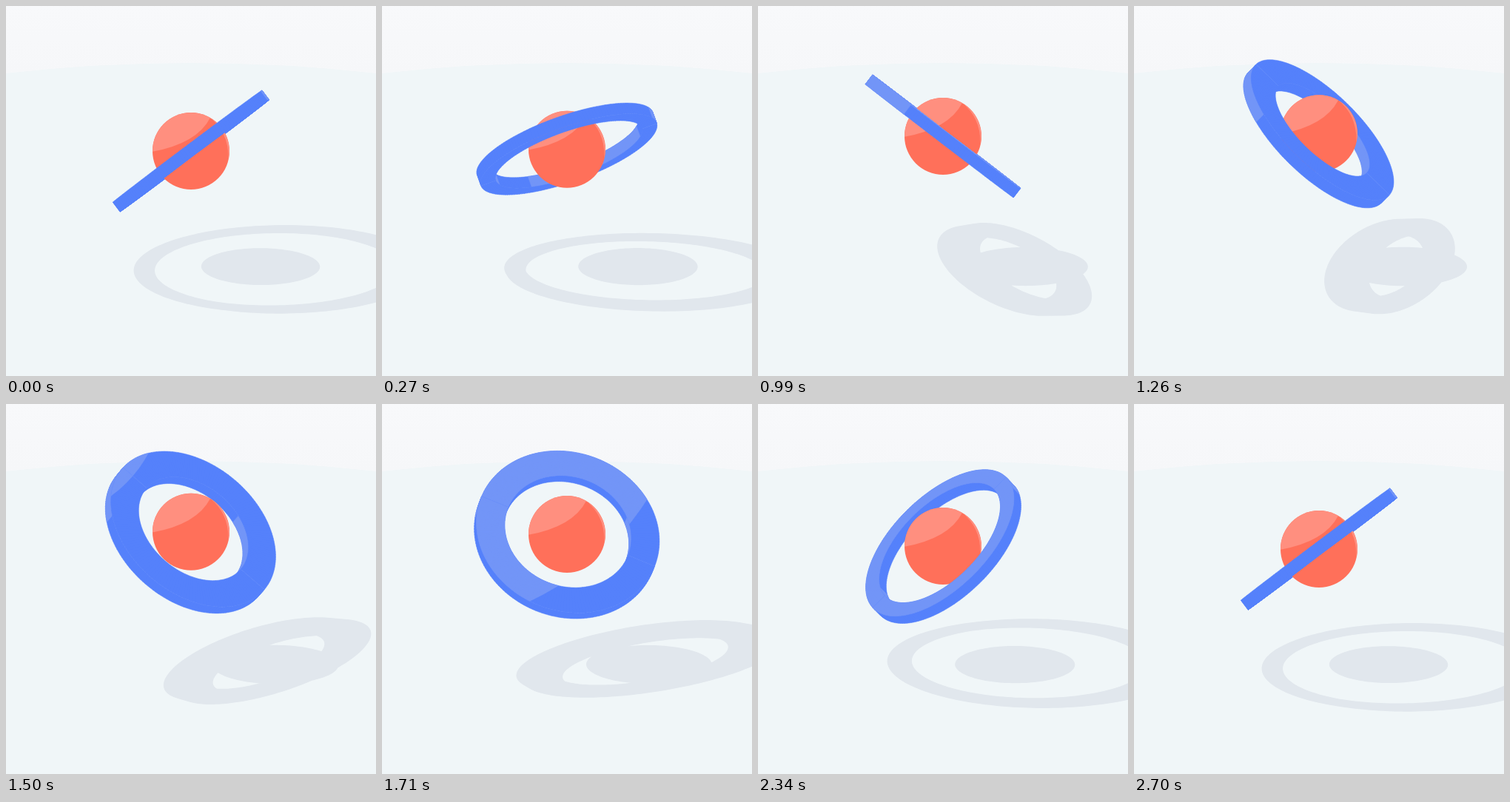
Animation, 500 px wide and 500 px high, one loop 2730 ms. Source, as an HTML page with a canvas:

```html
<!DOCTYPE html>
<html lang="en">
<head>
<meta charset="utf-8">
<title>Ringed planet</title>
<style>
html, body { margin: 0; width: 100%; height: 100%; overflow: hidden; background: #f0f6f8; }
canvas { display: block; width: 500px; height: 500px; }
</style>
</head>
<body>
<canvas id="stage" width="500" height="500"></canvas>
<script>
const ctx = document.getElementById('stage').getContext('2d');
const TURN = 2700, LOOP = 2730;      // one turn, then a short hold
const TAU = Math.PI * 2, RAD = Math.PI / 180;
const SEGS = 180, BALL = 52, OUTER = 126, HALF = 8;
const SIN = Math.sin(20 * RAD), COS = Math.cos(20 * RAD);   // camera pitch
const EYE = 8000;                                           // camera distance
const TILT = 41.4 * RAD, START = 24.7 * RAD;
const RIM = [0.608, 0.04, -0.793];                          // back light direction
const C = {
  ground: '#f0f6f8', shadow: '#e1e7ed',
  blue: '#5581fb', blueLit: '#7295f7',
  red: '#ff705a', redLit: '#ff8f7f'
};

// World axes: x right, y up, z towards the viewer; origin at the ball.
const dot = (a, b) => a[0] * b[0] + a[1] * b[1] + a[2] * b[2];
const mix = (a, s, b, t) => a.map((v, i) => v * s + b[i] * t);
const sub = (a, b) => mix(a, 1, b, -1);
const unit = a => mix(a, 1 / Math.hypot(...a), a, 0);
const cross = (a, b) => [
  a[1] * b[2] - a[2] * b[1], a[2] * b[0] - a[0] * b[2], a[0] * b[1] - a[1] * b[0]
];
const depth = p => p[1] * SIN + p[2] * COS;

function addPoly(path, pts) {
  let area = 0;
  pts.forEach((p, i) => {
    const q = pts[(i + 1) % pts.length];
    area += p[0] * q[1] - q[0] * p[1];
  });
  // one winding for all pieces, so that a joint fill is their union
  if (area < 0) pts.reverse();
  pts.forEach((p, i) => i ? path.lineTo(p[0], p[1]) : path.moveTo(p[0], p[1]));
  path.closePath();
}

function circle3(center, normal, radius) {
  const u = unit(cross(normal, Math.abs(normal[0]) < 0.9 ? [1, 0, 0] : [0, 1, 0]));
  const v = cross(normal, u);
  return Array.from({ length: 120 }, (_, i) => {
    const a = i / 120 * TAU;
    return mix(center, 1, mix(u, Math.cos(a), v, Math.sin(a)), radius);
  });
}

function fill(path, color) {
  ctx.fillStyle = color;
  ctx.fill(path);
}

// the hairline closes the seams between neighbouring pieces
function fillTight(path, color) {
  fill(path, color);
  ctx.strokeStyle = color;
  ctx.lineWidth = 0.5;
  ctx.lineJoin = 'round';
  ctx.stroke(path);
}

function drawBackdrop() {
  const sky = ctx.createLinearGradient(0, 0, 0, 90);
  sky.addColorStop(0, '#f8f9fb');
  sky.addColorStop(1, '#f6f7f9');
  ctx.fillStyle = sky;
  ctx.fillRect(0, 0, 500, 100);
  ctx.fillStyle = C.ground;
  ctx.beginPath();
  ctx.moveTo(0, 91);
  ctx.quadraticCurveTo(250, 63, 500, 91);
  ctx.lineTo(500, 500);
  ctx.lineTo(0, 500);
  ctx.fill();
}

function drawBall(cy) {
  ctx.save();
  ctx.translate(250, cy);
  ctx.beginPath();
  ctx.arc(0, 0, BALL, 0, TAU);
  ctx.fillStyle = C.red;
  ctx.fill();
  ctx.clip();
  ctx.fillStyle = C.redLit;
  ctx.beginPath();
  ctx.moveTo(-53, 1);
  ctx.quadraticCurveTo(8, -10, 26, -45);
  ctx.lineTo(26, -60);
  ctx.lineTo(-60, -60);
  ctx.fill();
  ctx.beginPath();
  ctx.arc(0, 0, BALL, -60 * RAD, 14 * RAD);
  ctx.quadraticCurveTo(52, -24, 26, -45);
  ctx.fill();
  ctx.restore();
}

function draw(ms) {
  const th = Math.min(ms % LOOP, TURN) / TURN * TAU;
  const phi = START + th;
  const cy = 184 + 12 * Math.cos(th);
  const rise = (196 - cy) / COS;
  const inner = 95.2 + 12 * Math.cos(th);
  const lamp = [-255, 470 - rise, 0];
  const floor = -166.7 - rise;

  const view = p => {
    const k = EYE / (EYE - depth(p));
    return [250 + p[0] * k, 250 + (cy - 250 - p[1] * COS + p[2] * SIN) * k];
  };
  const cast = p => {
    const k = (lamp[1] - floor) / (lamp[1] - p[1]);
    return view(mix(lamp, 1 - k, p, k));
  };

  // ring frame: up is the axis, e1 and e2 span its plane
  const cp = Math.cos(phi), sp = Math.sin(phi), ct = Math.cos(TILT), st = Math.sin(TILT);
  const up = [-st * cp, ct, -st * sp];
  const e1 = [sp, 0, -cp];
  const e2 = [-ct * cp, -st, -ct * sp];
  const spoke = i => {
    const a = i / SEGS * TAU;
    return mix(e1, Math.cos(a), e2, Math.sin(a));
  };
  const at = (d, r, h) => mix(d, r, up, h);
  const side = depth(up) > 0 ? 1 : -1;
  const faceNormal = mix(up, side, up, 0);
  const isLit = (p, n) => dot(unit(sub(lamp, p)), n) > 0.5 || dot(RIM, n) > 0.5;

  const layer = () => ({ face: new Path2D(), wall: new Path2D(), lit: new Path2D() });
  const far = layer(), near = layer(), shade = new Path2D();

  for (let i = 0; i < SEGS; i++) {
    const a = spoke(i), b = spoke(i + 1), m = spoke(i + 0.5);
    const front = depth(m) > 0;
    const part = front ? near : far;
    const face = h => [at(a, inner, h), at(b, inner, h), at(b, OUTER, h), at(a, OUTER, h)];
    const wall = r => [at(a, r, -HALF), at(b, r, -HALF), at(b, r, HALF), at(a, r, HALF)];
    const r = front ? OUTER : inner;
    const normal = mix(m, front ? 1 : -1, m, 0);
    addPoly(part.face, face(side * HALF).map(view));
    addPoly(part.wall, wall(r).map(view));
    if (isLit(at(m, r, 0), normal)) addPoly(part.lit, wall(r).map(view));
    for (const q of [face(HALF), face(-HALF), wall(OUTER), wall(inner)]) addPoly(shade, q.map(cast));
  }

  // the ball's outline as the lamp sees it
  const dist = Math.hypot(...lamp), ray = unit(lamp), s = BALL / dist;
  addPoly(shade, circle3(mix(ray, BALL * s, ray, 0), ray, BALL * Math.sqrt(1 - s * s)).map(cast));

  // lit disc on the plane of the visible face
  const gap = dot(lamp, faceNormal) - HALF;
  const rimFace = dot(RIM, faceNormal) > 0.5;
  const spot = new Path2D();
  if (gap > 0) {
    addPoly(spot, circle3(mix(lamp, 1, faceNormal, -gap), faceNormal, gap * Math.sqrt(3)).map(view));
  }

  const drawRing = part => {
    fillTight(part.wall, C.blue);
    fillTight(part.lit, C.blueLit);
    fillTight(part.face, rimFace ? C.blueLit : C.blue);
    if (gap > 0 && !rimFace) {
      ctx.save();
      ctx.clip(spot);
      fillTight(part.face, C.blueLit);
      ctx.restore();
    }
  };

  drawBackdrop();
  fill(shade, C.shadow);
  drawRing(far);
  drawBall(cy);
  drawRing(near);
}

const begin = performance.now();
function tick() {
  draw(performance.now() - begin);
  requestAnimationFrame(tick);
}
tick();
</script>
</body>
</html>
```
